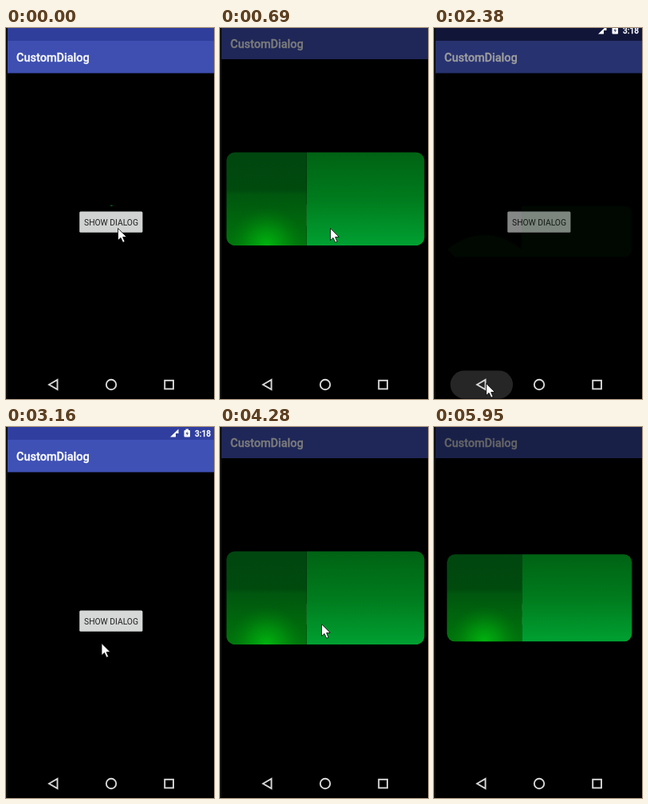
An HTML page with a canvas that plays this animation: 261 px wide and 464 px high, repeating every 6.79 s.

```html
<!DOCTYPE html>
<html lang="en">
<head>
<meta charset="utf-8">
<title>CustomDialog</title>
<style>
html, body { margin: 0; width: 100%; height: 100%; overflow: hidden; background: #000; }
canvas { display: block; }
</style>
</head>
<body>
<canvas id="stage" width="261" height="464"></canvas>
<script>
const c = document.getElementById('stage').getContext('2d');
const LOOP = 6790, TICK = 136;   // the screen refreshes once per tick
const CLOSE = 2244, REOPEN = 3580;
// Pointer moves: start, end, target x, target y.
const MOVES = [[0, 130, 138, 250], [1190, 1640, 65, 444], [2700, 3160, 127, 246],
  [4780, 5300, 97, 444], [5700, 5880, 66, 470]];

const clamp = v => Math.min(1, Math.max(0, v));
const smooth = p => p * p * (3 - 2 * p);

function box(x, y, w, h, fill, r = 0) {
  c.fillStyle = fill;
  c.beginPath();
  c.roundRect(x, y, w, h, r);
  c.fill();
}

function poly(points, fill, stroke, width) {
  c.beginPath();
  points.forEach(([x, y]) => c.lineTo(x, y));
  c.closePath();
  if (fill) { c.fillStyle = fill; c.fill(); }
  if (stroke) { c.strokeStyle = stroke; c.lineWidth = width; c.stroke(); }
}

function text(str, x, y, font, fill, align = 'left', bold = 0) {
  c.font = `${font} Roboto, sans-serif`;
  c.textAlign = align;
  c.fillStyle = c.strokeStyle = fill;
  c.fillText(str, x, y);
  if (bold) {
    c.lineWidth = bold;
    c.strokeText(str, x, y);
  }
}

function fade(gradient, ...stops) {
  stops.forEach(([at, color]) => gradient.addColorStop(at, color));
  return gradient;
}

function statusIcons(lift) {
  c.save();
  c.translate(0, -lift);
  poly([[216.5, 2.5], [216.5, 8], [213, 8], [213, 12.5], [206, 12.5]], '#fff');
  box(223.5, 4, 7.5, 8.5, '#fff', 1);
  box(225.5, 2.5, 3.5, 2, '#fff');
  poly([[228, 5], [225.5, 8.5], [227.5, 8.5], [226.5, 11.5], [229, 7.5], [227, 7.5]], '#1a2150');
  text('3:18', 257, 12, '500 10.1px', '#fff', 'right', .3);
  c.restore();
}

function dialog(s, cy) {
  c.save();
  c.translate(132.3, cy);
  c.scale(s, s);
  c.beginPath();
  c.roundRect(-116, -54.5, 232, 109, 10);
  c.clip();
  box(-22, -55, 139, 110, fade(c.createLinearGradient(0, -54, 0, 54),
    [0, '#006314'], [.5, '#007b1d'], [1, '#00a032']));
  box(-117, -55, 95, 110, fade(c.createLinearGradient(0, -54, 0, 54),
    [0, '#00460f'], [.4, '#004a0e'], [.45, '#00560e'], [1, '#00740c']));
  box(-117, -55, 95, 110, fade(c.createRadialGradient(-69, 55, 0, -69, 55, 45),
    [0, '#00b60f'], [.5, 'rgba(0,166,14,.5)'], [1, 'rgba(0,130,12,0)']));
  c.restore();
}

// The last trace of the fading dialog.
function trace() {
  box(110, 223, 138, 63, 'rgba(0,120,20,.07)', [0, 8, 8, 0]);
  c.beginPath();
  c.moveTo(17, 277);
  c.bezierCurveTo(44, 253, 82, 253, 110, 277);
  c.lineTo(110, 286);
  c.lineTo(26, 286);
  c.fill();
}

function navBar(ripple) {
  box(2, 428, 259, 36, '#000');
  box(20.5, 428.5, 78.5, 35, `rgba(255,255,255,${ripple})`, 17.5);
  poly([[54, 446], [64.5, 440], [64.5, 452]], null, '#d8d8d8', 1.9);
  c.beginPath();
  c.arc(132, 446, 6.2, 0, 7);
  c.stroke();
  c.strokeRect(199.2, 440.8, 10.8, 10.6);
}

function pointer(t) {
  let x = 140, y = 250;
  for (const [from, to, tx, ty] of MOVES) {
    const p = smooth(clamp((t - from) / (to - from)));
    x += (tx - x) * p;
    y += (ty - y) * p;
  }
  c.save();
  c.translate(x + .5, y + .6);
  poly([[0, 0], [0, 15], [3.5, 11.8], [6.2, 17.6], [8.6, 16.6], [6.1, 10.9], [10.8, 10.7]],
    '#fff', '#000', .8);
  c.restore();
}

// A slow start from the button, then a damped swing around full size.
function dialogScale(n) {
  if (n === 0) return .013;
  if (n < 5) return .32 + .02 * n;
  const m = n - 5;
  return 1 + .07 * Math.exp(-.45 * m) * Math.cos(m * Math.PI / 2);
}

function draw(now) {
  const t = now % LOOP;
  const scene = t < CLOSE ? 0 : t < REOPEN ? CLOSE : REOPEN;
  const n = Math.floor((t - scene) / TICK);
  const open = scene !== CLOSE;
  const raised = open ? n > 0 : n === 0;
  const dim = open ? .6 * (1 - Math.exp(-.38 * (n + .1))) : Math.max(0, .57 - .19 * n);
  const up = raised ? 17.3 : 0;

  box(0, 0, 261, 464, '#000');
  box(0, 0, 2, 464, '#0d0d0d');

  box(2, 0, 259, 56.4 - up, '#3f51b5');
  text('CustomDialog', 13, 42 - up, '500 14.5px', '#fff', 'left', .3);
  box(92.2, 229.6 - up / 2, 79.2, 26.2, '#d6d7d7', 1.5);
  text('SHOW DIALOG', 132, 246.5 - up / 2, '400 10.3px', '#212121', 'center');

  if (open ? n < 5 : n > 0) {
    box(2, 0, 259, 16, '#000');
    box(2, 0, 259, 16, `rgba(48,63,159,${open ? 1 : clamp(.58 * n)})`);
  }
  box(2, 0, 259, 428, `rgba(0,0,0,${dim})`);

  if (open) {
    dialog(dialogScale(n), n === 0 ? 222 : n < 5 ? 212 : 213.8);
  } else if (n === 0) {
    c.globalAlpha = .5;
    dialog(1, 213.8);
    c.globalAlpha = 1;
  } else {
    if (n === 1) trace();
    if (n < 9) statusIcons(Math.max(0, 10 - 5 * n));
  }

  navBar(open ? 0 : Math.max(0, .15 - .075 * Math.abs(n - 1)));
  pointer(scene + n * TICK);
}

const start = performance.now();
function tick() {
  draw(performance.now() - start);
  requestAnimationFrame(tick);
}
tick();
</script>
</body>
</html>
```
